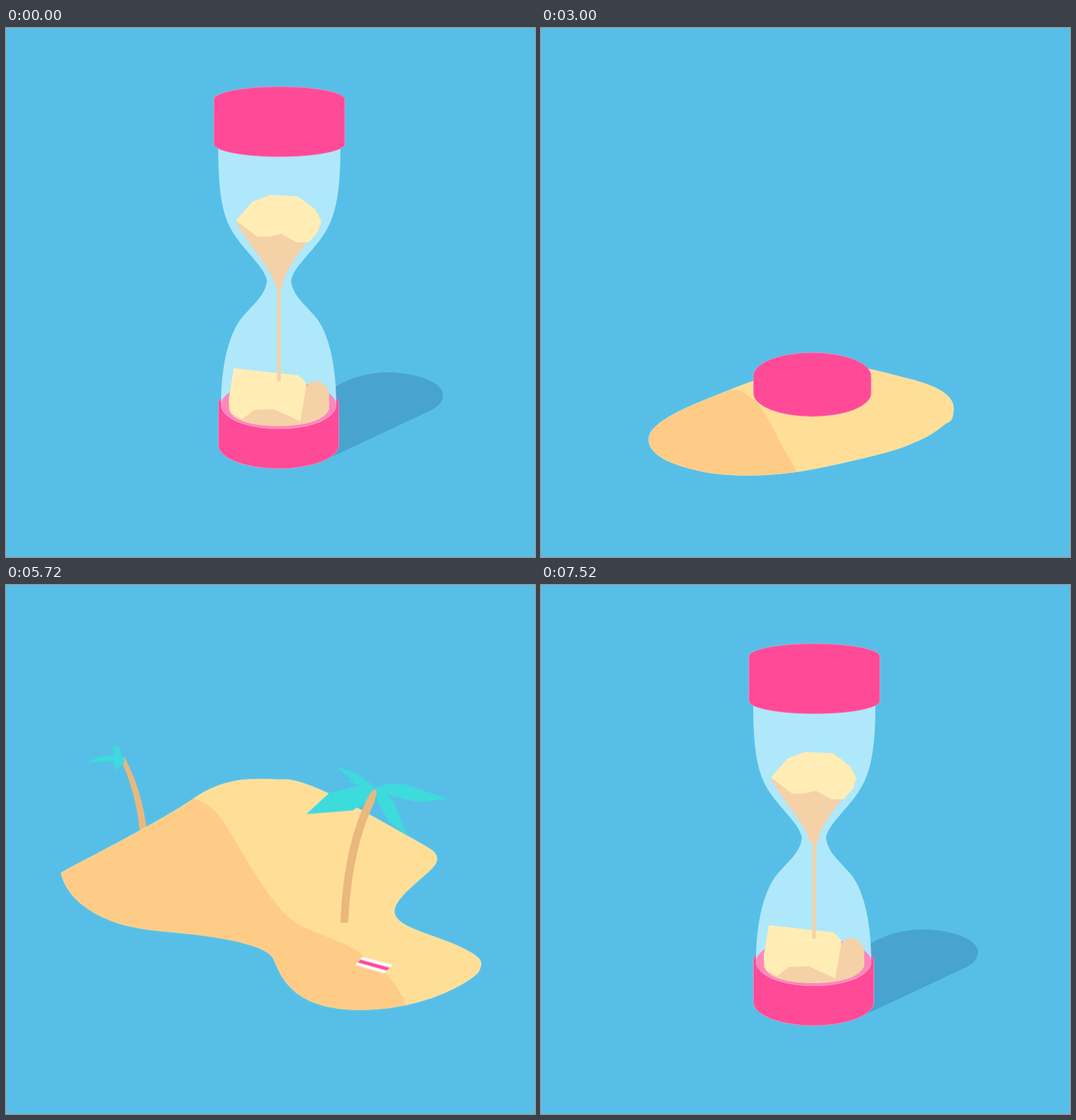
Recreate the animation shown at these times as an HTML page without scripts. Size 748 by 748 pixels, loop 7560 ms.

```html
<!DOCTYPE html>
<html lang="en">
<head>
<meta charset="utf-8">
<title>Hourglass island</title>
<style>
html, body { margin: 0; height: 100%; overflow: hidden; background: #57bfe7; }
svg { display: block; width: 100%; height: 100%; }
svg * { animation: 7560ms linear infinite both; }

.pink { fill: #ff4a98; }
.pale { fill: #ffedb5; }
.tan { fill: #f5d1a8; }
.white { fill: #fff; }
.trunk { fill: #e9b87d; }
.leaves { fill: #3ddbdc; }

/* --a: standing shape, --e: shape when it rises from the island */
.glass {
  --a: path("M300 165C300 235 306 268 324 294S365 338 369 357C367 378 350 390 334 409S304 470 304 533C304 552 340 567 386 567S467 552 467 533C467 470 454 428 438 409C422 390 405 378 403 357C407 338 430 320 448 294C466 268 473 235 473 165Z");
  --e: path("M292 185C292 205 293 225 294 245S296 285 296 305C296 318 295 330 295 340S294 357 294 365C294 380 325 392 364 392S434 380 434 365C434 357 433 348 433 340C433 330 432 318 432 305C432 285 433 265 434 245C435 225 436 205 436 185Z");
  fill: #afe8fa;
}
.bed {
  --a: path("M315 521L315 537C317 555 347 563 386 563S455 553 457 537L457 521Z");
  --e: path("M302 300L302 370C303 382 328 391 364 391S425 382 427 370L427 300Z");
}
.hump {
  --a: path("M318 525L416 515 424 508Q430 499 440 499Q455 503 457 520L457 540 315 540Z");
  --e: path("M301 246L394 238 400 214Q406 201 412 201Q424 208 427 226L427 370 302 370Z");
}
.crust {
  --a: path("M322 481L413 491 420 497 425 503 424 510 416 556 378 539 351 540 334 553 318 545 315 525Z");
  --e: path("M306 198L361 205 386 222 394 236 400 214 395 274 370 253 338 252 319 279 308 275 301 246Z");
}
.glass, .bed, .hump, .crust { animation-name: form; }
.cap, .base { stroke: #ff86bc; stroke-width: .8; rx: 93px; }
.cap { animation-name: cap, capShow; animation-timing-function: linear, step-end; }
.base { animation-name: base; }
.inner { fill: #ff86bc; animation-name: inner; }
.rise { animation-name: rise; }
.neck, .drain { transform-origin: 386px 362px; }
.neck { animation-name: neck; }
.drain { animation-name: drain; }
.pop { animation-name: pop; }
.body { transform-origin: 386px 623px; animation-name: sink, bodyShow; animation-timing-function: linear, step-end; }
.shadow { fill: #49a3cf; transform-origin: 386px 623px; animation-name: shadow; }

@keyframes cap {
  0%, 30.69% { x: 294px; y: 83px; width: 185px; height: 99px; ry: 18px; animation-timing-function: ease-out; }
  33.07% { x: 294px; y: 42px; width: 185px; height: 106px; ry: 19px; animation-timing-function: ease-in; }
  39.15%, 39.68% { x: 300px; y: 459px; width: 167px; height: 91px; ry: 33px; }
  41.27% { x: 345px; y: 462px; width: 90px; height: 14px; ry: 7px; }
  41.28%, 85.19% { x: 285px; y: 61px; width: 157px; height: 139px; ry: 18px; animation-timing-function: ease-in-out; }
  90.48%, 100% { x: 294px; y: 83px; width: 185px; height: 99px; ry: 18px; }
}
@keyframes base {
  0%, 39.68% { x: 300.5px; y: 499px; width: 170px; height: 124px; ry: 33px; }
  41.28%, 85.19% { x: 289px; y: 341px; width: 150px; height: 102px; ry: 26px; animation-timing-function: ease-in-out; }
  90.48%, 100% { x: 300.5px; y: 499px; width: 170px; height: 124px; ry: 33px; }
}
@keyframes inner {
  0%, 39.68% { cx: 385.5px; cy: 533px; rx: 81.5px; ry: 34px; }
  41.28%, 85.19% { cx: 364px; cy: 366px; rx: 70px; ry: 26px; animation-timing-function: ease-in-out; }
  90.48%, 100% { cx: 385.5px; cy: 533px; rx: 81.5px; ry: 34px; }
}
@keyframes form {
  0%, 39.68% { d: var(--a); }
  41.28%, 85.19% { d: var(--e); animation-timing-function: ease-in-out; }
  90.48%, 100% { d: var(--a); }
}
@keyframes capShow { 0% { visibility: visible; } 41.27% { visibility: hidden; } 82.01%, 100% { visibility: visible; } }
@keyframes bodyShow { 0% { visibility: visible; } 38.7% { visibility: hidden; } 82.01%, 100% { visibility: visible; } }
@keyframes rise {
  0% { transform: translateY(0); }
  30.69%, 39.68% { transform: translateY(-19px); }
  41.28%, 100% { transform: translateY(0); }
}
@keyframes drain {
  0% { transform: scale(1); }
  30.69%, 39.68% { transform: scale(.46); }
  41.28%, 100% { transform: scale(1); }
}
@keyframes neck {
  0%, 39.68% { transform: scale(1); }
  41.28%, 86.2% { transform: scale(0); animation-timing-function: ease-out; }
  91.5%, 100% { transform: scale(1); }
}
@keyframes sink {
  0%, 30.69% { transform: scale(1, 1); animation-timing-function: ease-out; }
  33.07% { transform: scale(1, 1.076); animation-timing-function: ease-in; }
  39.15% { transform: scale(.97, .247); }
  41.28%, 100% { transform: scale(1, 1); }
}
@keyframes pop {
  0%, 41.27% { transform: scale(1, 1); transform-origin: 386px 623px; }
  41.28%, 82.01% { transform: scale(1, .1); transform-origin: 364px 443px; animation-timing-function: ease-out; }
  83.6% { transform: scale(.94, 1.16); transform-origin: 364px 443px; animation-timing-function: ease-in-out; }
  85.19% { transform: scale(1, 1); transform-origin: 364px 443px; animation-timing-function: ease-in-out; }
  90.48% { transform: scale(.98, 1.07); transform-origin: 386px 623px; animation-timing-function: ease-in-out; }
  93.65% { transform: scale(1.01, .985); transform-origin: 386px 623px; animation-timing-function: ease-in-out; }
  95.77%, 100% { transform: scale(1, 1); transform-origin: 386px 623px; }
}
@keyframes shadow {
  0%, 33.07% { transform: translate(0, 0) scale(1, 1); animation-timing-function: ease-in; }
  38.1% { transform: translate(0, 0) scale(0, 0); }
  41.28%, 82.01% { transform: translate(-22px, -180px) scale(0, 0); }
  85.19% { transform: translate(-22px, -180px) scale(.8, .745); animation-timing-function: ease-in-out; }
  90.48%, 100% { transform: translate(0, 0) scale(1, 1); }
}

/* island: --a first spread, --b full shape */
.isle {
  --a: path("M153 582C153 555 225 530 267 513S350 484 390 478S480 487 520 497S584 520 583 540S576 557 572 560S555 573 545 578S529 585 520 589S495 598 480 602S402 622 361 628S265 636 225 627S152 605 153 582Z");
  --b: path("M78 412C88 405 215 343 265 308S360 281 395 281S515 331 560 356S610 382 609 395S552 440 549 464S600 497 640 515S672 540 669 549S600 604 500 604S388 552 378 532S300 500 215 493S86 448 78 412Z");
  fill: #ffdf97; stroke: #ffe3a6;
}
.shade {
  --a: path("M267 513C282 512 290 518 300 526S320 552 327 565S338 588 345 600S355 617 361 628L361 700 40 700 40 500Z");
  --b: path("M265 308C292 314 305 335 320 360S375 455 402 476S470 503 500 524S550 560 566 598L566 680 40 680 40 300Z");
  fill: #ffcc88;
}
.isle, .shade { animation-name: spread; }
.land { transform-origin: 386px 600px; animation-name: land, landShow; animation-timing-function: linear, step-end; }

@keyframes spread {
  0%, 39.68% { d: var(--a); animation-timing-function: cubic-bezier(.3, .6, .4, 1.06); }
  45.5%, 80.42% { d: var(--b); animation-timing-function: ease-in; }
  82.6%, 100% { d: var(--a); }
}
@keyframes land {
  0%, 34.92% { transform: translate(0, 0) scale(.1, .1); animation-timing-function: ease-out; }
  38.36% { transform: translate(0, 0) scale(1.1, 1.1); animation-timing-function: ease-in-out; }
  39.68%, 48.15% { transform: translate(0, 0) scale(1, 1); animation-timing-function: ease-in-out; }
  64.81% { transform: translate(0, 3px) scale(1, 1); animation-timing-function: ease-in-out; }
  75.66% { transform: translate(0, -3.5px) scale(1, 1.007); animation-timing-function: ease-in-out; }
  80.42% { transform: translate(0, 0) scale(1, 1); animation-timing-function: ease-in; }
  83.33%, 100% { transform: translate(-22px, -190px) scale(.25, .25); }
}
@keyframes landShow { 0% { visibility: hidden; } 34.92% { visibility: visible; } 83.2%, 100% { visibility: hidden; } }

.palm { animation-name: palm; }
.west { --h: .89; transform-origin: 194px 348px; }
.east { --h: 1.045; transform-origin: 479px 481px; }
.leaves use, .toy { animation-name: leaf; }
.toy { --sway: 0deg; }
.towel { transform-origin: 519px 541px; }
.parasol { transform-origin: 542px 528px; }
.early { animation-delay: -140ms; }
.late { animation-delay: 140ms; }

@keyframes palm {
  0%, 40.74% { transform: scale(0, 0); animation-timing-function: ease-out; }
  43.65% { transform: scale(1, 1.06); }
  45.5%, 68% { transform: scale(1, 1); animation-timing-function: ease-in-out; }
  75.66%, 77.51% { transform: scale(1, var(--h)); animation-timing-function: ease-in; }
  80.16%, 100% { transform: scale(0, 0); }
}
@keyframes leaf {
  0%, 41.8% { transform: rotate(0deg) scale(0); animation-timing-function: ease-out; }
  44.97% { transform: rotate(0deg) scale(1.1); }
  46.3%, 48.15% { transform: rotate(0deg) scale(1); animation-timing-function: ease-in-out; }
  56.08% { transform: rotate(var(--sway, 3deg)) scale(1); animation-timing-function: ease-in-out; }
  64.81% { transform: rotate(calc(-1 * var(--sway, 3deg))) scale(1); animation-timing-function: ease-in-out; }
  74.34% { transform: rotate(var(--tilt, 0deg)) scale(1); }
  76.98%, 100% { transform: rotate(var(--tilt, 0deg)) scale(0); }
}

.wave { transform-box: fill-box; transform-origin: center; }
.ring { animation-name: ring; }
.splash { animation-name: splash; }
@keyframes ring {
  0%, 39.5% { transform: translate(var(--x), calc(var(--y) * .64)) scale(0); }
  42.86% { transform: translate(var(--x), calc(var(--y) * .8)) scale(.8); }
  45.5% { transform: translate(var(--x), var(--y)) scale(0); }
  45.6%, 46.03% { transform: translate(0, 0) scale(0); animation-timing-function: ease-out; }
  48.15% { transform: translate(0, 0) scale(1); }
  59.5%, 100% { transform: translate(var(--x), var(--y)) scale(0); }
}
@keyframes splash {
  0%, 83.07% { transform: translate(0, 0) scale(0); animation-timing-function: ease-out; }
  85.19% { transform: translate(0, 0) scale(1); }
  95.24%, 100% { transform: translate(var(--x), var(--y)) scale(0); }
}
</style>
</head>
<body>
<svg viewBox="0 0 748 748">
  <defs>
    <clipPath id="shore"><path class="isle"/></clipPath>
    <path id="leaf" d="M0 0L18 -8 40 -10 100 0 60 9 20 6Z"/>
  </defs>

  <g class="white">
    <path class="wave ring" style="--x:-40px;--y:28px" d="M109 500Q119 526 191 519Q118 533 109 500Z"/>
    <path class="wave ring" style="--x:-56px;--y:96px" d="M492 643Q585 638 651 613Q590 647 492 643Z"/>
    <path class="wave ring" style="--x:14px;--y:6px" d="M659 376Q716 394 652 420Q697 396 659 376Z"/>
    <path class="wave splash" style="--x:-50px;--y:130px" d="M206 459Q216 486 306 485Q218 502 206 459Z"/>
    <path class="wave splash" style="--x:45px;--y:215px" d="M432 511Q545 506 541 478Q558 519 432 511Z"/>
    <path class="wave splash" style="--x:75px;--y:70px" d="M553 443Q574 426 580 407Q577 429 553 443Z"/>
  </g>

  <path class="shadow" d="M440 560L466 507C490 493 515 487 540 487C585 488 619 502 618 520C617 530 610 536 600 541L470 602Q455 609 430 615Z"/>

  <g class="pop">
    <g class="body">
      <rect class="base pink"/>
      <path class="glass"/>
      <ellipse class="inner"/>
      <path class="bed tan"/>
      <g class="rise">
        <path class="hump tan"/>
        <path class="crust pale"/>
        <rect class="neck tan" x="383.5" y="360" width="5" height="140"/>
      </g>
      <g class="neck">
        <g class="drain">
          <path class="tan" d="M325 274C345 310 376 340 380 363L386 368 391 366C393 340 415 320 446 273Z"/>
          <path class="pale" d="M325 272L349 245 374 236 413 238 437 256 446 273 441 288 428 303 411 303 389 291 372 295 355 295Z"/>
        </g>
      </g>
    </g>
  </g>

  <g class="land">
    <g class="palm west">
      <path class="trunk" d="M189 352C186 320 180 285 162 240L168 238C185 273 195 315 199 350Z"/>
      <g class="leaves" transform="translate(162 234)">
        <g transform="rotate(166) scale(1.02 1)"><use href="#leaf"/></g>
        <g transform="rotate(146) scale(.4 .5)"><use href="#leaf"/></g>
        <g transform="rotate(104) scale(.5 1.6)"><use href="#leaf"/></g>
        <g transform="rotate(234) scale(.38 1.2)"><use href="#leaf"/></g>
        <g transform="rotate(-31) scale(.74 .8)"><use href="#leaf" class="early"/></g>
        <g transform="rotate(-4) scale(.83 .9)"><use href="#leaf" class="early"/></g>
      </g>
    </g>
    <path class="isle"/>
    <g clip-path="url(#shore)"><path class="shade"/></g>
    <g class="toy towel">
      <path class="white" d="M489 518L575 541 551 565 468 541Z"/>
      <path class="pink" d="M483 526L567 549 558 557 475 534Z"/>
    </g>
    <g class="toy parasol early">
      <path d="M549 490L542 528" stroke="#e9b87d" stroke-width="1.3"/>
      <path class="pink" d="M517 476C524 460 540 457 553 457C572 459 584 471 584 490Q569 495 552 491Q530 488 517 476Z"/>
      <path class="white" d="M554 458Q536 469 533 487Q545 492 558 492Q562 474 554 458Z"/>
      <path class="white" d="M554 458Q538 460 518 475Q525 458 554 458Z"/>
      <path class="white" d="M554 458Q575 468 579 492L584 490Q584 465 554 458Z"/>
    </g>
    <g class="palm east">
      <g class="leaves" transform="translate(521 301)">
        <g transform="rotate(208) scale(1.24 1.2)"><use href="#leaf"/></g>
        <g transform="rotate(195) scale(.79 .7)"><use href="#leaf"/></g>
        <g transform="rotate(155) scale(1.02 1.75)"><use href="#leaf" class="late" style="--tilt:3deg"/></g>
        <g transform="rotate(8) scale(1.05 1.1)"><use href="#leaf" class="late"/></g>
        <g transform="rotate(54) scale(.79 1.1)"><use href="#leaf" class="late"/></g>
      </g>
      <path class="trunk" d="M473 481C476 410 490 350 515 308Q520 301 524 304Q524 315 516 330C498 370 487 420 484 481Q478 483 473 481Z"/>
    </g>
  </g>

  <g class="pop"><rect class="cap pink"/></g>
</svg>
</body>
</html>
```
